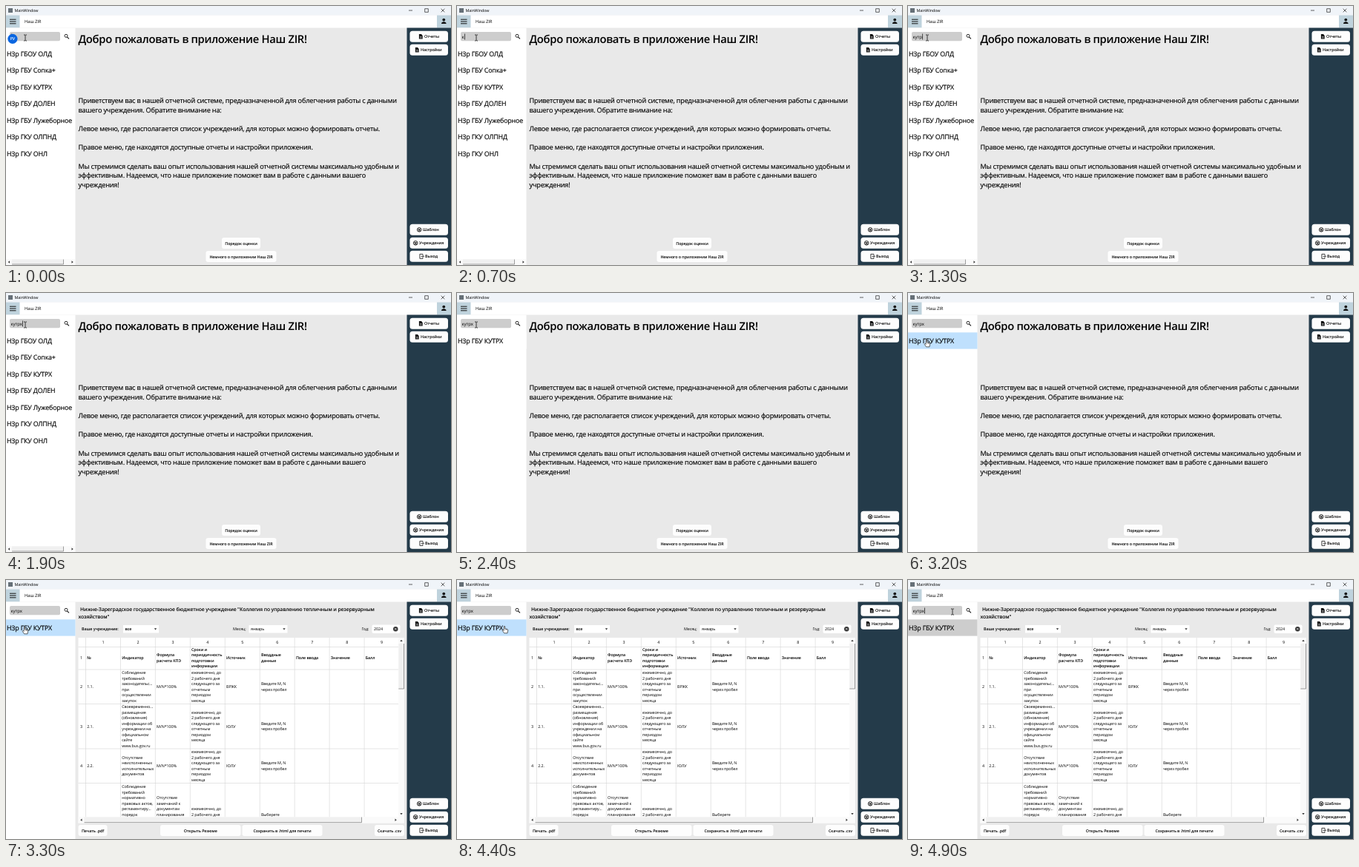
An HTML page that plays this animation: 600 px wide and 350 px high, repeating every 5 s.

```html
<!DOCTYPE html>
<html lang="ru">
<head>
<meta charset="utf-8">
<style>
html, body { margin: 0; width: 100%; height: 100%; overflow: hidden; background: #fff; }
svg { display: block; width: 600px; height: 350px; }
text {
  font-family: "Open Sans", "Noto Sans", sans-serif;
  letter-spacing: -.02em; white-space: pre; fill: #000;
  text-rendering: geometricPrecision;
}
.b { font-weight: 600; }
.dark { stroke: #000; stroke-width: .15; }
.mid { text-anchor: middle; }
</style>
</head>
<body>
<svg id="stage" viewBox="0 0 600 350"></svg>
<script>
const LOOP = 5000, LIST = 8.85, BODY = 9.15, SMALL = 5.4;
const APP = 'Наш ZIR', QUERY = 'кутрх';
const KEYS = [700, 900, 1100, 1300, 1500];
const FILTER = 2000, SELECT = 3200, OPEN = 3300, REFOCUS = 4900;
const POINTER = [[0, 26, 43], [2600, 26, 43], [2900, 26, 68], [3900, 26, 68],
  [4400, 65, 67], [4500, 65, 67], [4900, 60, 43]];
const ORGS = ['ГБОУ ОЛД', 'ГБУ Сопка+', 'ГБУ КУТРХ', 'ГБУ ДОЛЕН', 'ГБУ Лужеборное',
  'ГКУ ОЛПНД', 'ГКУ ОНЛ'].map(s => 'НЗр ' + s);

const text = (x, y, s, size = SMALL, cls = '', extra = '') =>
  `<text x="${x}" y="${y}" font-size="${size}" class="${cls}" ${extra}>${s}</text>`;
const rect = (x, y, w, h, fill, r = 0, extra = '') =>
  `<rect x="${x}" y="${y}" width="${w}" height="${h}" fill="${fill}" rx="${r}" ${extra}/>`;
const path = (d, stroke = '#111', width = .8, fill = 'none', extra = '') =>
  `<path d="${d}" stroke="${stroke}" stroke-width="${width}" fill="${fill}" ${extra}/>`;
const group = (id, body) => `<g id="${id}">${body}</g>`;
const button = (x, y, w, h, label) =>
  rect(x, y, w, h, '#fdfdfd', 3) + text(x + w / 2, y + h / 2 + 2, label, SMALL, 'b mid');
const arrow = (x, y, turn = 0) =>
  path('M-1.7 -1H1.7L0 1.2Z', 'none', 0, '#333', `transform="translate(${x} ${y}) rotate(${turn})"`);
// Raised scrollbar thumb: light face, dark right and bottom edges
const thumb = (x, y, w, h) => rect(x, y, w, h, '#f0f0f0') +
  path(`M${x + w} ${y}V${y + h}H${x}`, '#777', .7);

// Icons, about 6 px wide, centred on x, y
const at = (x, y, body) => `<g transform="translate(${x} ${y})">${body}</g>`;
const docIcon = path('M-2.3 -3.2H.8L2.5 -1.4V3.2H-2.3Z', 'none', 0, '#111') +
  path('M-1.1 .3H1.3M-1.1 1.7H1.3', '#fff', .6);
const wheelIcon = '<circle r="2.8" fill="none" stroke="#111" stroke-width=".9"/>' +
  path('M-2 -.6H2M0 0V2.4M-1.6 1.6L0 0L1.6 1.6', '#111', .9);
const exitIcon = path('M1.8 -1.5V-3H-2.3V3H1.8V1.5M-.6 0H3M1.8 -1.2L3 0L1.8 1.2');

function chrome() {
  const side = [[34, 'Отчеты', 564, docIcon], [52, 'Настройки', 559, docIcon],
    [295, 'Шаблон', 562, wheelIcon], [313, 'Учреждения', 557, wheelIcon], [331, 'Выход', 565, exitIcon]];
  return rect(0, 0, 600, 12.5, '#f0f4f9') + rect(3, 3, 6, 6, '#667078') +
    text(11.5, 8, 'MainWindow') +
    path('M543 6H548M564.7 3.7H569.3V8.3H564.7ZM586.7 3.7L591.3 8.3M591.3 3.7L586.7 8.3', '#222', .7) +
    rect(0, 12.5, 600, 17, '#fff') +
    rect(0, 12.5, 18.5, 17, '#bfd3dd') + path('M5 18.2H13.5M5 21H13.5M5 23.8H13.5', '#111', 1) +
    text(25, 23, APP, 5.9) +
    rect(581, 12.5, 19, 17, '#bfd3dd') +
    path('M587 24C587 20.3 593.6 20.3 593.6 24Z', 'none', 0, '#111') +
    '<circle cx="590.3" cy="18.6" r="1.9" fill="#111"/>' +
    rect(540.5, 29.5, 59.5, 320.5, '#243b4a') +
    side.map(([y, label, x, icon]) => rect(544.5, y - .3, 51.5, 15.1, '#fdfdfd', 3.5) +
      at(x - 4.8, y + 7.3, icon) + text(x, y + 9.3, label, SMALL, 'b')).join('');
}

function leftPanel() {
  const bar = rect(0, 342, 93, 8, '#fafafa') + thumb(8, 342.5, 69.5, 6.5) +
    arrow(4, 346, 90) + arrow(89.5, 346, -90);
  return rect(0, 29.5, 93.5, 320.5, '#fff') +
    rect(5, 35, 68, 12.3, '#cdcdcd', 2) +
    '<circle cx="81" cy="40.3" r="2" fill="none" stroke="#111" stroke-width=".9"/>' +
    path('M82.4 41.8L85 44.4', '#111', 1.1) +
    group('all', ORGS.map((s, i) => text(1, 67.6 + i * 22.5, s, LIST, 'dark')).join('') + bar) +
    group('found', rect(0, 53.3, 93.5, 22.3, '#fff', 0, 'id="row"') + text(1, 67.6, ORGS[2], LIST, 'dark'));
}

function home() {
  const lines = ['Приветствуем вас в нашей отчетной системе, предназначенной для облегчения работы с данными',
    'вашего учреждения. Обратите внимание на:', '',
    'Левое меню, где располагается список учреждений, для которых можно формировать отчеты.', '',
    'Правое меню, где находятся доступные отчеты и настройки приложения.', '',
    'Мы стремимся сделать ваш опыт использования нашей отчетной системы максимально удобным и',
    'эффективным. Надеемся, что наше приложение поможет вам в работе с данными вашего',
    'учреждения!'];
  return text(97.5, 50.4, `Добро пожаловать в приложение ${APP}!`, 14.75, 'b') +
    lines.map((s, i) => text(97.5, 131 + i * 12.65, s, BODY, 'dark')).join('') +
    button(291, 313, 52, 15, 'Порядок оценки') +
    button(269.5, 331, 95, 15, `Немного о приложении ${APP}`);
}

const colX = i => 107.5 + i * 46.95;
// Text lines centred on y; slots reserves room for lines below the clip
function cell(col, y, s, cls = '', slots = 0) {
  const lines = s.split('|'), n = slots || lines.length;
  return lines.map((line, i) =>
    text(colX(col) + 1.7, y + 2 + (i - (n - 1) / 2) * 7.45, line, SMALL, cls)).join('');
}

function table() {
  const due = 'ежемесячно, до|2 рабочего дня|следующего за|отчетным|периодом|месяца';
  const heads = ['№', 'Индикатор', 'Формула|расчета КПЭ', 'Сроки и|периодичность|подготовки|информации',
    'Источник', 'Вводдные|данные', 'Поле ввода', 'Значение', 'Балл'];
  const rows = [
    [144, '1.1.', 'Соблюдение|требований|законодательс...|при|осуществлении|закупок', 'ВРЖК'],
    [197.5, '2.1.', 'Своевременно...|размещения|(обновления)|информации об|учреждении на|официальном|сайте|www.bus.gov.ru', 'ЮЛУ'],
    [251, '2.2.', 'Отсутствие|неисполненных|исполнительных|документов', 'ЮЛУ']];
  let grid = 'M107.5 78V320M97.5 90.5H529', cells = '';
  heads.forEach((s, i) => {
    grid += `M${colX(i + 1)} 78V320`;
    cells += text(colX(i) + 23.5, 86, i + 1, SMALL, 'mid') + cell(i, 105, s, 'b');
  });
  for (const y of [121, 167.5, 228, 274.5]) grid += `M97.5 ${y}H529`;
  rows.forEach(([y, no, what, who]) => {
    [no, what, 'M/N*100%', due, who, 'Введите M, N|через пробел'].forEach((s, i) => cells += cell(i, y, s));
  });
  [105, 144, 197.5, 251].forEach((y, i) => cells += text(101.5, y + 2, i + 1, SMALL, 'mid'));
  cells += cell(1, 327.7, 'Соблюдение|требований|нормативно|правовых актов,|регламентиру...|порядок', '', 14) +
    cell(2, 327.7, 'Отсутствие|замечаний к|документам|планирования', '', 10) +
    cell(3, 327.7, 'ежемесячно, до|2 рабочего дня', '', 6) + cell(5, 327.7, 'Выберете', '', 4);

  return text(100, 42, 'Нижне-Зареградское государственное бюджетное учреждение "Коллегия по управлению тепличным и резервуарным', 6.8, 'b') +
    text(97.5, 52, 'хозяйством"', 6.8, 'b') +
    text(102, 68, 'Ваше учреждение:', SMALL, 'b') + rect(158, 61, 48, 10.5, '#fff') +
    text(160.5, 68, 'все', SMALL, 'b') + arrow(201.5, 66.3) +
    text(306, 68, 'Месяц:') + rect(327.5, 61, 52, 10.5, '#fff') + text(330, 68, 'январь') + arrow(375, 66.3) +
    text(479.5, 68, 'Год:') + rect(493.5, 60.5, 38, 11.5, '#fff', 2) + text(496, 68, '2024') +
    '<circle cx="525.3" cy="66.2" r="3.2" fill="#333"/>' +
    path('M524 64.9L526.6 67.5M526.6 64.9L524 67.5', '#fff', .7) +
    rect(97.5, 78, 439.5, 250.5, '#fff') +
    `<clipPath id="clip"><rect x="97" y="78" width="433" height="242"/></clipPath>` +
    `<g clip-path="url(#clip)">${path(grid, '#d4d4d4', .6)}${cells}</g>` +
    rect(529, 78, 8, 242, '#fafafa') + thumb(529.3, 86, 7.2, 61) +
    arrow(533, 82, 180) + arrow(533, 316) +
    rect(97.5, 320, 439.5, 8.5, '#fafafa') + thumb(105.5, 320.5, 374, 7.2) +
    arrow(101.5, 324.2, 90) + arrow(525.5, 324.2, -90) +
    button(97.5, 331, 39, 15, 'Печать .pdf') + button(208, 331, 108.5, 15, 'Открыть Резюме') +
    button(318.5, 331, 108, 15, 'Сохранить в .html для печати') + button(497, 331, 40, 15, 'Скачать .csv');
}

const beam = path('M-2 -4H-.6L0 -3.4L.6 -4H2M0 -3.4V3.4M-2 4H-.6L0 3.4L.6 4H2', '#111', .8);
const hand = path('M-1.8 -4.3Q-1 -5.2 -.3 -4.3V-1.2L3 -.5Q3.9 0 3.7 1L3 4.8H-1.4L-3.8 1.4Q-3.7 .2 -2.6 .7L-1.8 1.4Z',
  '#222', .7, '#fff') + path('M.8 -1V.8M2.1 -.7V.9', '#222', .4);

const $ = id => document.getElementById(id);
$('stage').innerHTML = rect(0, 0, 600, 350, '#e9e9e9') + chrome() + leftPanel() +
  group('home', home()) + group('table', table()) +
  text(6.5, 43.6, '', 6.1, '', 'id="query"') + rect(0, 37.5, .7, 8, '#111', 0, 'id="caret"') +
  group('badge', '<circle cx="8.9" cy="44.3" r="6.6" fill="#0a66e0"/>' +
    text(8.9, 46.3, 'РУ', 5.4, 'b mid', 'style="fill:#fff"')) +
  group('pointer', group('beam', beam) + group('hand', hand));

const show = (id, on) => $(id).setAttribute('display', on ? 'inline' : 'none');

function pointerAt(t) {
  const i = POINTER.findIndex(p => p[0] > t);
  if (i < 0) return POINTER[POINTER.length - 1].slice(1);
  const [t0, x0, y0] = POINTER[i - 1], [t1, x1, y1] = POINTER[i];
  const k = (t - t0) / (t1 - t0), e = k * k * (3 - 2 * k);
  return [x0 + (x1 - x0) * e, y0 + (y1 - y0) * e];
}

function draw(t) {
  const [x, y] = pointerAt(t), over = t >= FILTER && y > 53.3;
  const typed = KEYS.filter(k => k <= t), lastKey = typed.length ? typed[typed.length - 1] : 0;
  $('query').textContent = QUERY.slice(0, typed.length);
  $('caret').setAttribute('x', 7 + (typed.length ? $('query').getComputedTextLength() : 0));
  show('caret', t >= REFOCUS || t < SELECT && (t - lastKey) % 1060 < 530);
  show('badge', t < KEYS[0]);
  show('all', t < FILTER);
  show('found', t >= FILTER);
  show('home', t < OPEN);
  show('table', t >= OPEN);
  show('beam', !over);
  show('hand', over);
  $('row').setAttribute('fill', t >= REFOCUS ? '#cdcdcd'
    : t >= SELECT ? (over ? '#bfe0fd' : '#cce8ff') : over ? '#e5f3ff' : '#fff');
  $('pointer').setAttribute('transform', `translate(${x} ${y})`);
}

function tick() {
  draw(Math.floor(performance.now() % LOOP / 100) * 100);
  requestAnimationFrame(tick);
}
tick();
</script>
</body>
</html>
```
